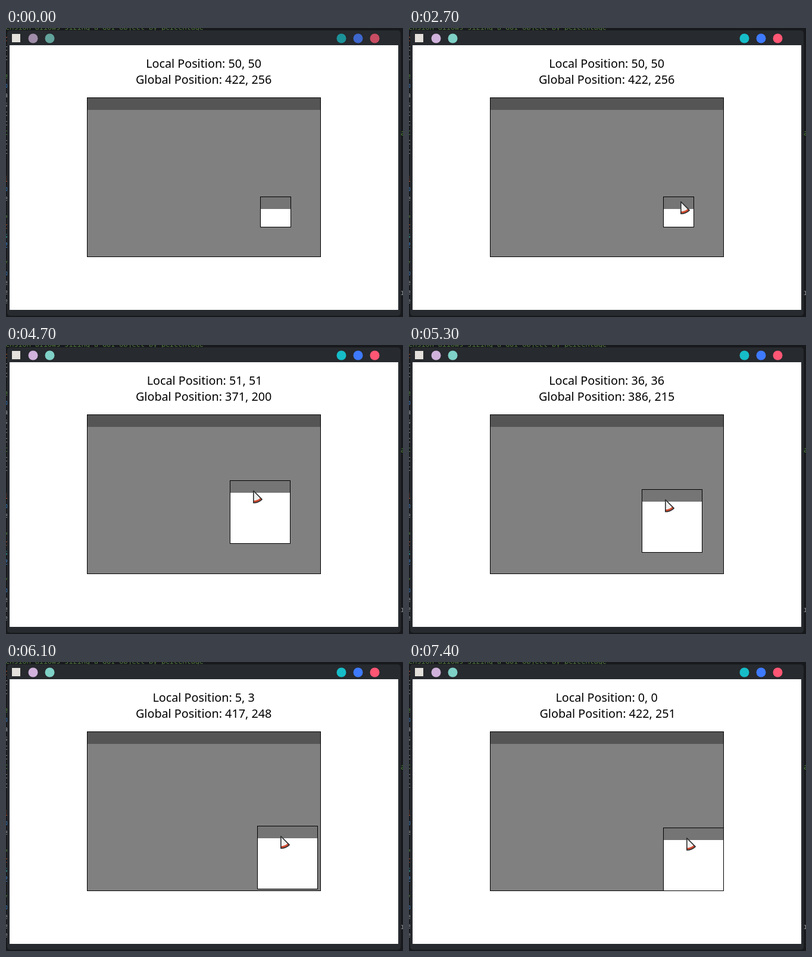
Write an HTML page with a canvas that moves like this. It is 667 by 487 pixels and loops after 8000 ms.

```html
<!DOCTYPE html>
<html lang="en">
<head>
<meta charset="utf-8">
<title>Draggable box</title>
<style>
  html, body { margin: 0; height: 100%; overflow: hidden; background: #17191c; }
  canvas { display: block; }
</style>
</head>
<body>
<canvas id="stage" width="667" height="487"></canvas>
<script>
const ctx = document.getElementById('stage').getContext('2d');
const LOOP = 8000, STEP = 100;
const PARENT = { left: 136, top: 117, right: 528, bottom: 385 };

// Waypoints of the free pointer: [time, x, y]
const waypoints = [
  [600, 559, 0], [1200, 343, 12], [1700, 343, 12], [2200, 475, 200],
  [2600, 393, 185], [2700, 456, 292], [3200, 430, 286], [4200, 380, 230], [4500, 416, 246]
];

const mix = (a, b, p) => a + (b - a) * p;
const ramp = (t, from, to) => Math.min(1, Math.max(0, (t - from) / (to - from)));
const easeOut = p => 1 - (1 - p) ** 1.4;

function pointerAt(t) {
  let [, x, y] = waypoints[0];
  for (let i = 1; i < waypoints.length; i++) {
    const [end, nx, ny] = waypoints[i], p = ramp(t, waypoints[i - 1][0], end);
    x = mix(x, nx, p);
    y = mix(y, ny, p);
  }
  return [Math.round(x), Math.round(y)];
}

// Size and distance to the parent's bottom right corner
function boxAt(t) {
  const grow = ramp(t, 3500, 3900), adjust = ramp(t, 3900, 4000);
  const lift = ramp(t, 4600, 4900), slide = easeOut(ramp(t, 5000, 6100));
  const near = ramp(t, 6200, 6400), back = ramp(t, 6500, 6700), dock = ramp(t, 6900, 7400);
  const start = 50 + 4 * lift, settle = back - 2 * dock;
  const w = Math.round(51 + 58 * grow - 8 * adjust);
  const h = Math.round(51 + 50 * grow + 5 * adjust);
  const dx = Math.round(mix(start, 5, slide) - 4 * near + settle);
  const dy = Math.round(mix(start, 3, slide) - 2 * near + settle);
  const right = PARENT.right - dx, bottom = PARENT.bottom - dy;
  return { dx, dy, right, bottom, left: right - w, top: bottom - h };
}

function rect(x, y, w, h, color) {
  ctx.fillStyle = color;
  ctx.fillRect(x, y, w, h);
}

function disc(x, y, r, color) {
  ctx.fillStyle = color;
  ctx.beginPath();
  ctx.arc(x, y, r, 0, 7);
  ctx.fill();
}

function put(text, x, y, color) {
  ctx.fillStyle = color;
  ctx.fillText(text, x, y);
}

function panel({ left, top, right, bottom }, body, bar) {
  const w = right - left - 1, h = bottom - top - 1;
  rect(left, top, w + 2, h + 2, '#000');
  rect(left + 1, top + 1, w, h, body);
  rect(left + 1, top + 1, w, 20, bar);
}

// Centres the inked width of the line
function label(text, y) {
  ctx.font = '19.75px "Noto Sans", sans-serif';
  const m = ctx.measureText(text);
  put(text, 332.5 + (m.actualBoundingBoxLeft - m.actualBoundingBoxRight) / 2, y, '#000');
}

// Code behind the window; only the edges of its lines show
function editor() {
  const lines = 'rtt eoasctttt  loe =rs2 *oeee';
  const hues =  'oww gbwwwwgw   obw gotb gbwww';
  const colors = { g: '#4f8a3a', o: '#c0582f', b: '#3c7fc4', w: '#8c9096', t: '#2f9a9a' };
  rect(0, 0, 667, 487, '#17191c');
  ctx.font = '11.8px "Noto Sans Mono", monospace';
  put('Extension allows sizing a GUI object by percentage', -22, 3, '#527a3d');
  for (let i = 0; i < lines.length; i++) put(lines[i], -4, 22 + 15.8 * i, colors[hues[i]]);
  put('a', 663, 181, colors.g);
  put('r', 663, 450, colors.w);
}

function appWindow(active) {
  ctx.fillStyle = '#272a2e';
  ctx.beginPath();
  ctx.roundRect(2, 4, 661, 481, 5);
  ctx.fill();
  rect(6, 29, 653, 446, '#fff');
  rect(10, 10, 14, 14, '#e4e1dc');
  const colors = active
    ? ['#d0b2dc', '#7fd1c7', '#16bdc8', '#3e7aff', '#ff5674']
    : ['#9f8da9', '#62a39c', '#1b9198', '#3e67cd', '#c84c62'];
  colors.forEach((color, i) => disc(45.5 + 28 * i + (i > 1 ? 462 : 0), 17.5, 8, color));
}

const wedge = new Path2D('M.8 .8V21A20.2 20.2 0 0 0 15.1 15.1Z');
const rim = new Path2D('M.8 21A20.2 20.2 0 0 0 15.1 15.1L12.5 12.5A16.5 16.5 0 0 1 .8 17.3Z');
const corner = new Path2D('M.5 .5H18.5V5H5.5V18.5H.5Z');
const arrow = new Path2D('M8 8.5L17.5 12L12.5 17.5Z');

function cursor(x, y, resizing) {
  const [body, accent] = resizing ? [corner, arrow] : [wedge, rim];
  ctx.save();
  ctx.translate(x, y);
  ctx.lineJoin = 'round';
  ctx.strokeStyle = '#2b2d2f';
  ctx.lineWidth = 1.6;
  ctx.fillStyle = '#f0f0ee';
  ctx.fill(body);
  ctx.fillStyle = '#d04a30';
  ctx.fill(accent);
  ctx.stroke(body);
  if (resizing) ctx.stroke(accent);
  ctx.restore();
}

function draw(now) {
  const t = Math.floor(now % LOOP / STEP) * STEP;
  const box = boxAt(t);

  editor();
  appWindow(t >= 1600);
  label(`Local Position: ${box.dx}, ${box.dy}`, 67);
  label(`Global Position: ${box.left - 5}, ${box.top - 28}`, 94);
  panel(PARENT, '#808080', '#555');
  panel(box, '#fff', '#757575');

  const resizing = t >= 3200 && t < 4300, dragging = t >= 4500;
  if (resizing) cursor(box.left + 3, box.top + 1, true);
  else if (dragging) cursor(box.left + 39, box.top + 17);
  else if (t >= 600) cursor(...pointerAt(t));

  requestAnimationFrame(draw);
}
requestAnimationFrame(draw);
</script>
</body>
</html>
```
